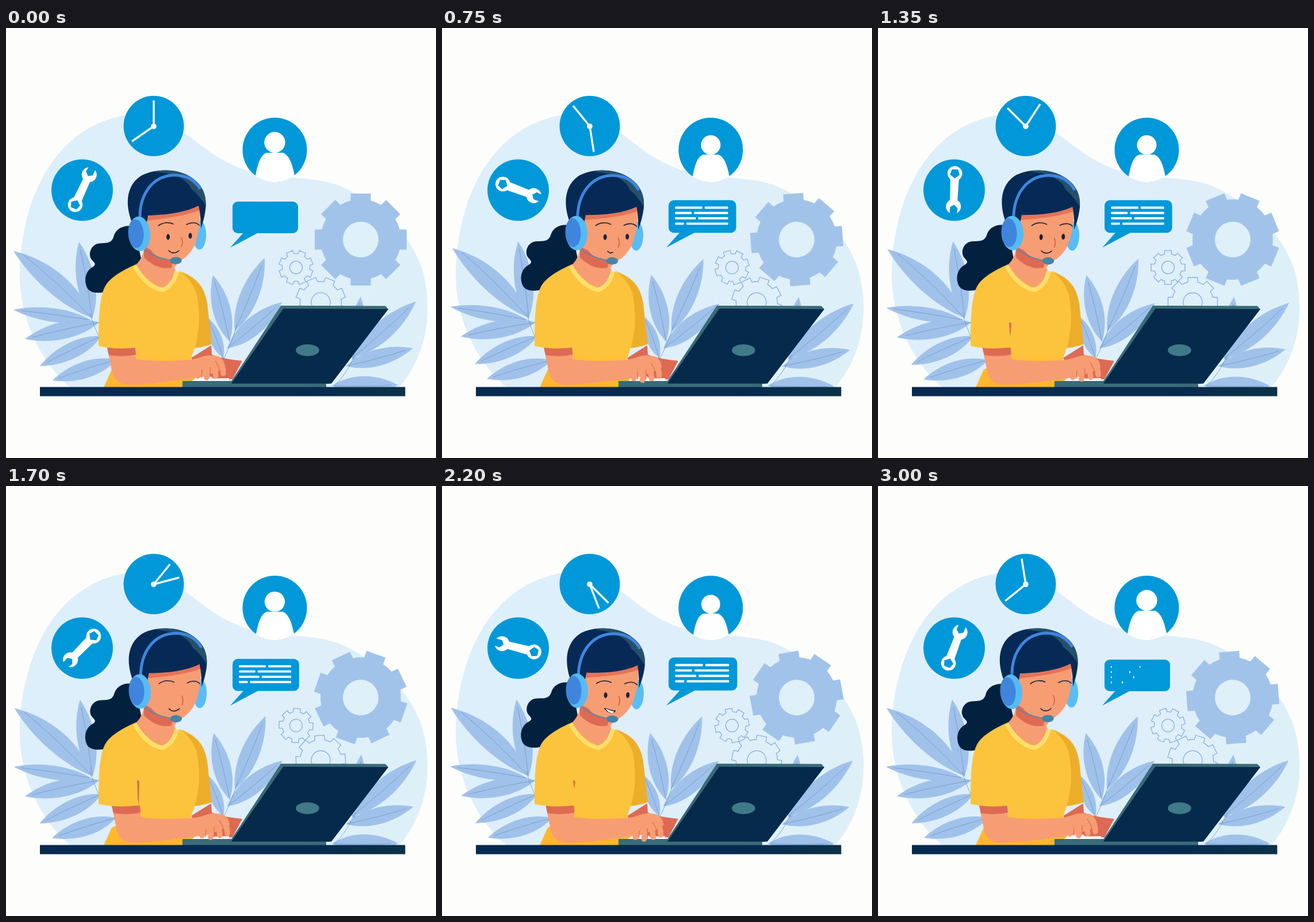
Recreate the animation shown at these times as an HTML page. Size 748 by 748 pixels, loop 3.05 s.

```html
<!DOCTYPE html>
<html lang="en">
<head>
<meta charset="utf-8">
<title>Support desk</title>
<style>
  html, body { margin: 0; width: 100%; height: 100%; overflow: hidden; background: #fdfdfc; }
  svg { display: block; width: 100vw; height: 100vh; }
  .blue { fill: #0098d8; }
  .leaf { fill: #a0c2ea; }
  .vein { fill: none; stroke: #6f96cb; stroke-width: .8; }
  .skin { fill: #f79d73; }
  .shade { fill: #dd6a54; }
  .ink { fill: none; stroke: #14233f; stroke-width: 1.6; stroke-linecap: round; }
  .dark { fill: #14233f; }
  .teal { fill: #3a6b78; }
  .wire { fill: none; stroke: #86afdc; stroke-width: 1.3; }
  .finger { fill: none; stroke: #f79d73; stroke-width: 9.5; stroke-linecap: round; stroke-linejoin: round; }
  .crease { fill: none; stroke: #dd6a54; stroke-width: 1.2; stroke-linecap: round; }
</style>
</head>
<body>
<svg viewBox="0 0 748 748" xmlns="http://www.w3.org/2000/svg">
  <defs>
    <linearGradient id="sky" x1="0" y1="0" x2="1" y2=".35">
      <stop offset="0" stop-color="#dbf0fa"/><stop offset=".5" stop-color="#deeefb"/>
      <stop offset="1" stop-color="#def0f7"/>
    </linearGradient>
    <linearGradient id="cloth" x1="0" y1="0" x2="0" y2="1">
      <stop offset=".72" stop-color="#fcc43d"/><stop offset=".88" stop-color="#fdb82d"/>
    </linearGradient>
    <linearGradient id="wood"><stop offset=".7" stop-color="#062a50"/><stop offset="1" stop-color="#0c3148"/></linearGradient>
    <clipPath id="badge"><circle cx="467.5" cy="212" r="56.3"/></clipPath>
  </defs>

  <rect width="748" height="748" fill="#fdfdfc"/>
  <path fill="url(#sky)" d="M118 630C60 585 24 505 24 430C24 320 70 178 205 152C250 145 288 166 318 188C360 220 395 250 470 258C520 263 560 261 602 285C645 308 702 352 724 420C742 482 738 565 680 630Z"/>

  <circle class="blue" cx="257" cy="170.5" r="52.5"/>
  <g transform="translate(257 171)" stroke="#fff" stroke-width="3.4">
    <path id="fast" d="M0 0V-45"/><path id="slow" d="M0 0V-46"/>
    <circle r="4.8" fill="#fff" stroke="none"/>
  </g>

  <circle class="blue" cx="132.5" cy="282" r="53.5"/>
  <g id="wrench" fill="#fff">
    <circle cy="-29" r="13"/><circle cy="28.5" r="12.8"/>
    <path d="M-6.5 -20L0 -22L6.5 -20L7.5 20H-7.5Z"/>
    <path class="blue" d="M-6 -45L-7.5 -32L-1 -26L6 -30.5L6 -45Z"/>
    <path class="blue" d="M0 20L8.5 26.5L5.2 35.5H-5.2L-8.5 26.5Z"/>
  </g>

  <circle class="blue" cx="467.5" cy="212" r="56"/>
  <g clip-path="url(#badge)"><g id="person" fill="#fff">
    <circle cx="467.5" cy="199" r="18.2"/>
    <path d="M433 262C437 240 441 222 453 217H482C494 222 499 240 503 262V275H433Z"/>
  </g></g>

  <g id="bubble">
    <rect class="blue" x="394" y="302" width="114" height="55" rx="9"/>
    <path class="blue" d="M415 354L390 382L441 355Z"/>
    <g id="rows" fill="#fff"></g>
  </g>

  <path id="gearA" fill="#a1c3ea" fill-rule="evenodd"/>
  <path id="gearB" class="wire"/>
  <path id="gearC" class="wire"/>

  <g id="plantL"></g>
  <g id="plantM"></g>
  <g id="plantR"></g>

  <g id="tail"><path fill="#02213f" d="M222 345C203 342 190 350 187 364C182 378 168 372 157 376C146 381 143 395 149 403C153 408 158 410 152 415C140 421 136 434 139 446C142 459 152 462 168 460C190 455 210 430 236 405Z"/></g>

  <!-- far arm -->
  <path class="shade" d="M322 574L357 552L358 568C375 575 394 577 411 579L394 611L365 612L335 592Z"/>
  <path fill="#fff" d="M322 611L388 609L388 615L318 615Z"/>

  <!-- body -->
  <path fill="#ecae2a" d="M305 424C335 436 345 452 350 478L358 550Q342 556 324 557L328 460Z"/>
  <path fill="url(#cloth)" d="M226 411C205 421 182 432 172 450C162 470 161 505 161 553Q190 559 226 557V578L184 594L170 625H307L328 611L322 574C332 550 338 520 335 490C334 465 330 445 303 423L270 440Z"/>
  <path class="teal" d="M307 614H557V625H307Z"/>
  <path id="fold" class="shade"/>
  <path class="skin" d="M226 412C238 400 241 388 240 370L304 400L293 417L296 424C291 441 282 450 271 451C255 446 238 432 226 412Z"/>
  <path class="shade" d="M240 380L240 399C254 413 270 420 288 417L290 404Z"/>
  <path fill="none" stroke="#ffdf6c" stroke-width="7.2" d="M224 414C236 437 256 454 272 455.5C287 450 294 437 297 423"/>

  <!-- near arm -->
  <g id="arm">
    <path class="skin" d="M176 557L184 596C188 616 200 623 230 620C270 618 308 611 342 607L372 596L381 590C380 578 374 571 362 570C348 567 338 574 322 577C290 580 250 580 226 576L225 556Z"/>
    <path class="shade" d="M176 556L225 556L226 568C208 572 192 571 179 569Z"/>
    <g id="hand">
      <path class="finger" d="M341 588L334 605M353 586L349 608M362 578L365 605M367 575C374 580 378 588 378 601"/>
      <path class="crease" d="M341 594L340 607M355 590L355 607M364 579C369 586 372 592 372 601"/>
    </g>
  </g>
  <path fill="#fcc43d" d="M161 535H224L226 556Q190 560 161 553Z"/>

  <!-- head -->
  <g id="head">
    <ellipse cx="336.5" cy="360" rx="11.7" ry="25.5" fill="#58bdf5"/>
    <path class="skin" d="M243 325C243 360 242 382 262 396C280 405 296 407 305 404C320 395 331 378 334 358C338 340 338 322 336 306Z"/>
    <path fill="#e4745a" d="M244 324L336 306L337 317C310 327 280 331 245 335Z"/>
    <path fill="#062a55" d="M223 347C206 312 207 275 235 257C262 243 297 245 320 259C344 272 350 295 347 316C345 331 342 340 339 349C339 335 338 322 335 309C311 321 282 325 247 326L243 350Z"/>
    <path fill="#24506a" d="M258 250C288 243 316 252 330 266C342 277 349 293 347 308C338 294 330 286 322 280C318 267 300 258 290 255C278 251 268 252 258 250Z"/>
    <path fill="none" stroke="#3f86df" stroke-width="5" d="M233 332C232 290 254 258 291 256C312 255 328 264 338 280"/>
    <ellipse cx="232" cy="358" rx="19" ry="30" fill="#55bbf4" transform="rotate(-4 232 358)"/>
    <ellipse cx="226" cy="357.5" rx="13.5" ry="25" fill="#4085dd" transform="rotate(-4 226 357)"/>
    <path fill="none" stroke="#4a8cb4" stroke-width="1.7" d="M242 386C254 396 272 402 290 404"/>
    <ellipse cx="295.5" cy="404.5" rx="10.3" ry="6.3" fill="#4584a6"/>
    <path class="ink" stroke-width="1.3" d="M265 344C273 338 283 337 291 341M314 342C321 338 330 337 336 343"/>
    <path fill="none" stroke="#c95d4c" stroke-width="1.6" d="M305 364C308 371 307 377 305 381"/>
    <g id="eyes" class="dark"><ellipse cx="282" cy="363.5" rx="3" ry="5"/><ellipse cx="320.5" cy="361.5" rx="3" ry="5"/></g>
    <g id="mouths">
      <path class="ink" d="M283 387C288 393 296 392 301 387"/>
      <ellipse class="dark" cx="291" cy="390" rx="3.7" ry="4"/>
      <path class="ink" d="M287 388L292 391L296 389.5"/>
      <g><path class="dark" d="M280 386C288 386 294 390 301 389C299 396 288 397 280 386Z"/><path fill="#fff" d="M283 387C290 388 293 391 298 390.5L296 394C290 394 287 392 283 387Z"/></g>
      <path class="ink" d="M283 386.5C287 390 293 391 298 390"/>
    </g>
  </g>

  <!-- desk -->
  <path class="teal" d="M478 483L660 483.5L665 489L562 619H389Z"/>
  <path fill="#062a4b" d="M482.5 488L665 489L566 618.5H392Z"/>
  <ellipse cx="524.5" cy="560.5" rx="20.3" ry="10.3" fill="#407987"/>
  <rect x="59" y="624.5" width="635.5" height="16" fill="url(#wood)"/>
</svg>
<script>
const $ = id => document.getElementById(id);
const set = (el, d) => el.setAttribute('transform', d);
const LOOP = 3050, STEP = 50;

function gear(r, outer, w, hole) {
  const h = w / 2, edge = Math.asin(h / r);
  let d = '';
  for (let k = 0; k < 8; k++) {
    const a = k * Math.PI / 4, c = Math.cos(a), s = Math.sin(a);
    const at = (x, y) => `${(x * c - y * s).toFixed(2)} ${(x * s + y * c).toFixed(2)}`;
    const foot = -r * Math.cos(edge);
    d += `${k ? `A${r} ${r} 0 0 1 ` : 'M'}${at(-h, foot)}L${at(-h, -outer)}L${at(h, -outer)}L${at(h, foot)}`;
  }
  d += `A${r} ${r} 0 0 1 ${-h} ${-r * Math.cos(edge)}Z`;
  return `${d}M${hole} 0A${hole} ${hole} 0 1 0 ${-hole} 0A${hole} ${hole} 0 1 0 ${hole} 0Z`;
}
$('gearA').setAttribute('d', gear(70, 80, 35, 31));
$('gearB').setAttribute('d', gear(24, 29.5, 12, 11));
$('gearC').setAttribute('d', gear(36, 43, 17, 16.5));

// Each leaf: base x, y, tip x, y, width, optional bend
function leaf([x, y, tx, ty, w, bend = 0]) {
  const dx = tx - x, dy = ty - y, len = Math.hypot(dx, dy);
  const nx = -dy / len, ny = dx / len;
  const p = (f, side) => {
    const off = side * w * .6 + bend;
    return `${x + dx * f + nx * off} ${y + dy * f + ny * off}`;
  };
  return `<path class="leaf" d="M${x} ${y}C${p(.28, 1)} ${p(.68, .95)} ${tx} ${ty}C${p(.68, -.95)} ${p(.28, -1)} ${x} ${y}Z"/>
    <path class="vein" d="M${x} ${y}Q${p(.5, .12)} ${p(.9, 0)}"/>`;
}
function plant(id, stem, leaves) {
  $(id).innerHTML = leaves.map(leaf).join('') + `<path class="vein" d="${stem}"/>`;
}
plant('plantL', 'M146 496Q150 512 164 542', [
  [149, 504, 13, 388, 42, 6], [150, 505, 127, 372, 36], [147, 508, 13, 490, 27],
  [162, 512, 33, 541, 34], [166, 536, 59, 588, 32], [192, 577, 81, 613, 33]]);
plant('plantM', 'M402 515Q394 545 378 577', [
  [378, 574, 350, 503, 24], [389, 545, 360, 430, 35], [398, 527, 450, 400, 36], [385, 557, 480, 477, 36]]);
plant('plantR', 'M572 622Q594 600 607 568', [
  [605, 582, 617, 467, 32], [602, 574, 713, 476, 38], [592, 588, 708, 557, 33], [568, 622, 682, 621, 36]]);

const breaks = [451, 433, 440, 420];
const bars = breaks.flatMap((b, row) => [[405, b], [b + 4, 494.5]].map(([x, end]) => {
  const el = document.createElementNS('http://www.w3.org/2000/svg', 'rect');
  el.setAttribute('x', x);
  el.setAttribute('y', 312.7 + row * 9);
  el.setAttribute('height', 3.8);
  el.setAttribute('rx', 1.2);
  $('rows').append(el);
  return { el, row, len: end - x };
}));

// Value of a [time, value] table, eased between entries
function track(keys, t) {
  let i = 1;
  while (i < keys.length - 1 && keys[i][0] <= t) i++;
  const [t0, v0] = keys[i - 1], [t1, v1] = keys[i];
  const f = Math.min(1, (t - t0) / (t1 - t0));
  return v0 + (v1 - v0) * f * f * (3 - 2 * f);
}
const clamp = v => Math.max(0, Math.min(1, v));

const sway = [[0, 0], [500, 1], [1000, .95], [1700, .3], [2200, .45], [2500, .3], [3050, .36]];
const reach = [[0, 0], [500, -1], [1000, 3.5], [1700, 8], [2200, 4.5], [2500, 0], [3050, 0]];
const press = [[0, 0], [500, 7], [1000, 2], [1700, 3], [2200, 6], [2500, 2], [3050, 0]];
const speech = [[0, 0], [300, 1], [750, 2], [1300, 0], [1950, 3], [2350, 4], [2800, 0]];
const blinks = [[1650, 1800], [2950, 3050]];

function draw(t) {
  const spin = Math.max(0, t * .12 - 4.5);
  const pulse = (1 - Math.cos(t / 600 * 2 * Math.PI)) / 2;

  set($('fast'), `rotate(${spin * 2})`);
  set($('slow'), `rotate(${235.5 + spin})`);
  set($('wrench'), `translate(132.5 281.5) rotate(${25 + spin})`);
  set($('gearA'), `translate(617 368) rotate(${spin})`);
  set($('gearB'), `translate(504.5 416.7) rotate(${22.5 - spin})`);
  set($('gearC'), `translate(547.5 477) rotate(${22.5 + spin})`);

  set($('person'), `translate(467.5 268) scale(${1 - .13 * pulse}) translate(-467.5 -268)`);
  set($('bubble'), `translate(390 382) scale(${1 + .062 * pulse}) translate(-390 -382)`);
  for (const { el, row, len } of bars) {
    const start = 190 + row * 100;
    const grow = Math.min(clamp((t - start) / 250), clamp((3010 - t) / 300));
    el.setAttribute('width', t < start ? 0 : Math.max(1.6, len * grow));
  }

  const s = track(sway, t);
  set($('plantL'), `rotate(${2 * s} 160 530)`);
  set($('plantM'), `rotate(${1.6 * s} 380 575)`);
  set($('plantR'), `rotate(${1.4 * s} 575 620)`);

  const nod = `rotate(${3.6 * pulse} 275 420)`;
  set($('head'), nod);
  set($('tail'), nod);
  $('eyes').style.display = blinks.some(([a, b]) => t >= a && t < b) ? 'none' : '';
  const mouth = speech.filter(k => k[0] <= t).pop()[1];
  [...$('mouths').children].forEach((m, i) => m.style.display = i === mouth ? '' : 'none');

  const x = track(reach, t), down = track(press, t);
  set($('arm'), `translate(${x} 0)`);
  set($('hand'), `translate(${-.35 * down} ${down})`);
  const open = clamp((x - 3) / 5);
  $('fold').setAttribute('d', open ? `M228 512L232 513L${230 + open} ${513 + 43 * open}L229 ${513 + 30 * open}Z` : '');
}

const begin = performance.now();
function tick() {
  const t = (performance.now() - begin) % LOOP;
  draw(Math.floor(t / STEP) * STEP);
  requestAnimationFrame(tick);
}
draw(0);
tick();
</script>
</body>
</html>
```
